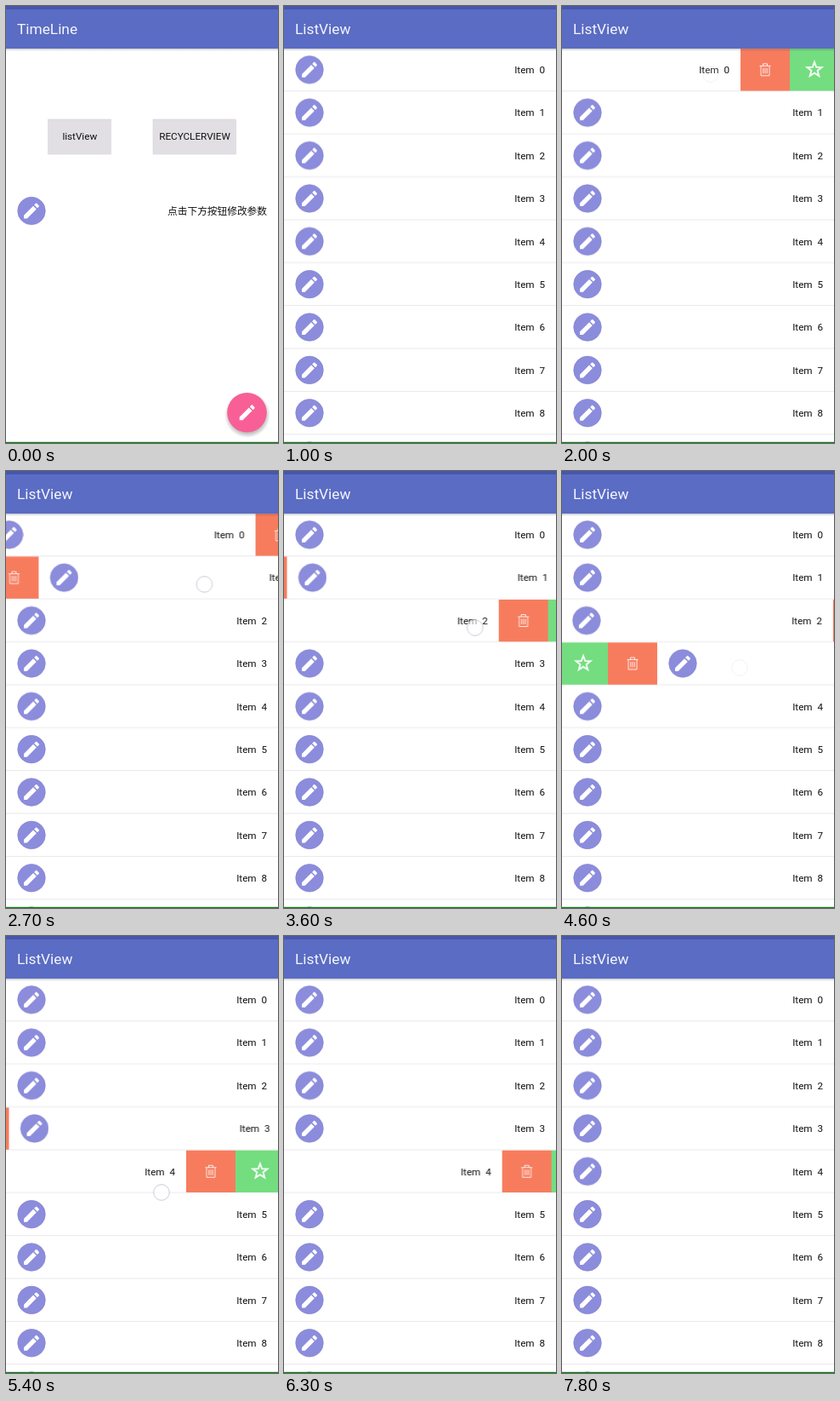
These frames come from a looping animation (320 px wide and 513 px high, 8000 ms). An HTML page:

```html
<!DOCTYPE html>
<html lang="zh">
<head>
<meta charset="utf-8">
<title>TimeLine</title>
<style>
  html, body { margin: 0; width: 100%; height: 100%; overflow: hidden; background: #fff; }
  svg { display: block; width: 100vw; height: 100vh; }
  text { font: 11.7px Roboto, "Noto Sans CJK SC", "Noto Sans CJK", sans-serif; fill: #111; }
  .title { font-size: 17.3px; fill: #f4f5fc; }
  .mid { text-anchor: middle; }
  .end { text-anchor: end; }
  .touch { fill: #fff; fill-opacity: .6; stroke: #c9c9d8; stroke-width: 1; opacity: 0; }
</style>
</head>
<body>
<svg viewBox="0 0 320 513" preserveAspectRatio="none">
  <defs>
    <linearGradient id="shade" x2="0" y2="1">
      <stop stop-color="#000" stop-opacity=".2"/>
      <stop offset="1" stop-color="#000" stop-opacity="0"/>
    </linearGradient>
    <radialGradient id="glow">
      <stop offset=".78" stop-color="#000" stop-opacity=".25"/>
      <stop offset="1" stop-color="#000" stop-opacity="0"/>
    </radialGradient>
    <path id="pencil" fill="#fff" transform="translate(-12 -12)" d="M3 17.25V21h3.75L17.81 9.94l-3.75-3.75zM20.71 7.04c.39-.39.39-1.02 0-1.41l-2.34-2.34c-.39-.39-1.02-.39-1.41 0l-1.83 1.83 3.75 3.75z"/>
    <g id="badge">
      <circle r="16.3" fill="#8c8cdd" stroke="#8383cc" stroke-width=".6"/>
      <use href="#pencil"/>
    </g>
    <g id="trash">
      <rect x="-29" y="-24.6" width="58" height="49.4" fill="#f77c5e"/>
      <path fill="none" stroke="#fff" stroke-opacity=".85" d="M-6.5-4.5H6.5M-2.5-4.5V-7H2.5V-4.5M-5-4.5V7H5V-4.5M-2.2-2V4.5M0-2V4.5M2.2-2V4.5"/>
    </g>
    <g id="star">
      <rect x="-29" y="-24.6" width="58" height="49.4" fill="#74dd80"/>
      <path id="starShape" fill="none" stroke="#fff" stroke-opacity=".9" stroke-width="2"/>
    </g>
    <g id="bar">
      <rect width="320" height="50" fill="#5a6cc3"/>
      <rect width="320" height="4" fill="#4656aa"/>
      <rect y="50" width="320" height="3" fill="url(#shade)"/>
    </g>
  </defs>

  <g id="home">
    <rect width="320" height="513" fill="#fff"/>
    <use href="#bar"/>
    <text class="title" x="13" y="33">TimeLine</text>
    <g fill="#e1dfe3" stroke="#d6d4d8" stroke-width=".6">
      <rect x="49.5" y="133" width="74" height="41"/>
      <rect x="173" y="133" width="97.5" height="41"/>
    </g>
    <text class="mid" x="86.8" y="157.3">listView</text>
    <text class="mid" x="222" y="157.3">RECYCLERVIEW</text>
    <use href="#badge" x="30" y="240.5"/>
    <text class="end" x="307" y="244.7">点击下方按钮修改参数</text>
    <circle cx="284" cy="480" r="27" fill="url(#glow)"/>
    <circle cx="283.5" cy="477.3" r="23.3" fill="#f85f96"/>
    <use href="#pencil" x="283.7" y="477.3"/>
    <circle id="tap" class="touch" cx="90" cy="160" r="9.3"/>
  </g>

  <g id="list">
    <rect width="320" height="560" fill="#fff"/>
    <g id="rows"></g>
    <use href="#bar"/>
    <text class="title" x="13" y="33">ListView</text>
    <g id="touches"></g>
  </g>
  <rect y="511.8" width="320" height="1.2" fill="#0b7d12"/>
</svg>

<script>
const LOOP = 8000, STEP = 100, ROW = 50.37, FIRST = 74.8;
const CLOSING = [1, .55, .23, .03, .01, 0];

// row, direction, touch start x, touch y, drag start, close start, drag distances
const swipes = [
  [0, -1, 285, 80, 1600, 2500, [0, 14, 48, 88, 110, 116]],
  [1, 1, 195, 133, 2500, 3300, [0, 12, 38, 80, 110, 116]],
  [2, -1, 292, 184, 3300, 4200, [0, 10, 34, 67, 100, 116]],
  [3, 1, 97, 231, 4200, 5100, [0, 14, 52, 90, 112, 116]],
  [4, -1, 291, 301, 5100, 6200, [0, 30, 74, 108, 116]]
];

const byId = id => document.getElementById(id);
const play = (el, frames) => el.animate(
  frames.map(([t, style]) => ({ offset: t / LOOP, ...style })),
  { duration: LOOP, iterations: Infinity });
const shift = x => ({ transform: `translateX(${x}px)` });

byId('starShape').setAttribute('d', 'M' + Array.from({ length: 10 }, (_, i) => {
  const r = i % 2 ? 3.8 : 9, a = i * Math.PI / 5;
  return `${(r * Math.sin(a)).toFixed(2)} ${(-r * Math.cos(a)).toFixed(2)}`;
}).join('L') + 'Z');

byId('rows').innerHTML = Array.from({ length: 10 }, (_, i) => `
  <g transform="translate(0 ${FIRST + i * ROW})">
    <rect y="24.5" width="320" height="1" fill="#e9e9eb"/>
    <g class="row">
      <use href="#star" x="-87"/><use href="#trash" x="-29"/>
      <use href="#badge" x="30"/>
      <text class="end" x="307" y="4.3">Item\u00a0\u00a0${i}</text>
      <use href="#trash" x="349"/><use href="#star" x="407"/>
    </g>
  </g>`).join('');

byId('touches').innerHTML = swipes.map(([, , x, y]) =>
  `<circle class="touch" cx="${x}" cy="${y}" r="9.3"/>`).join('');

const rows = document.querySelectorAll('.row');
const touches = byId('touches').children;

swipes.forEach(([row, dir, , , start, close, drag], i) => {
  const opening = drag.map((d, k) => [start + k * STEP, shift(dir * d)]);
  const closing = CLOSING.map((c, k) => [close + k * STEP, shift(dir * 116 * c)]);
  play(rows[row], [[0, shift(0)], ...opening, ...closing, [LOOP, shift(0)]]);

  const press = drag.map((d, k) => [start + k * STEP,
    { ...shift(dir * d), opacity: k < 4 ? 1 : k === 4 ? .25 : 0 }]);
  const last = start + drag.length * STEP;
  const hidden = { ...shift(dir * 116), opacity: 0 };
  play(touches[i], [[0, { ...shift(0), opacity: 0 }], [start - 20, { ...shift(0), opacity: 0 }],
    ...press, [last, hidden], [LOOP, hidden]]);
});

play(byId('tap'), [[0, { opacity: 0 }], [280, { opacity: 0 }], [300, { opacity: 1 }],
  [500, { opacity: 1 }], [600, { opacity: 0 }], [LOOP, { opacity: 0 }]]);

const page = (y, opacity) => ({ transform: `translateY(${y}px)`, opacity, easing: 'ease-out' });
play(byId('list'), [[0, page(40, 0)], [700, page(40, 0)], [950, page(0, 1)], [LOOP, page(0, 1)]]);
</script>
</body>
</html>
```
